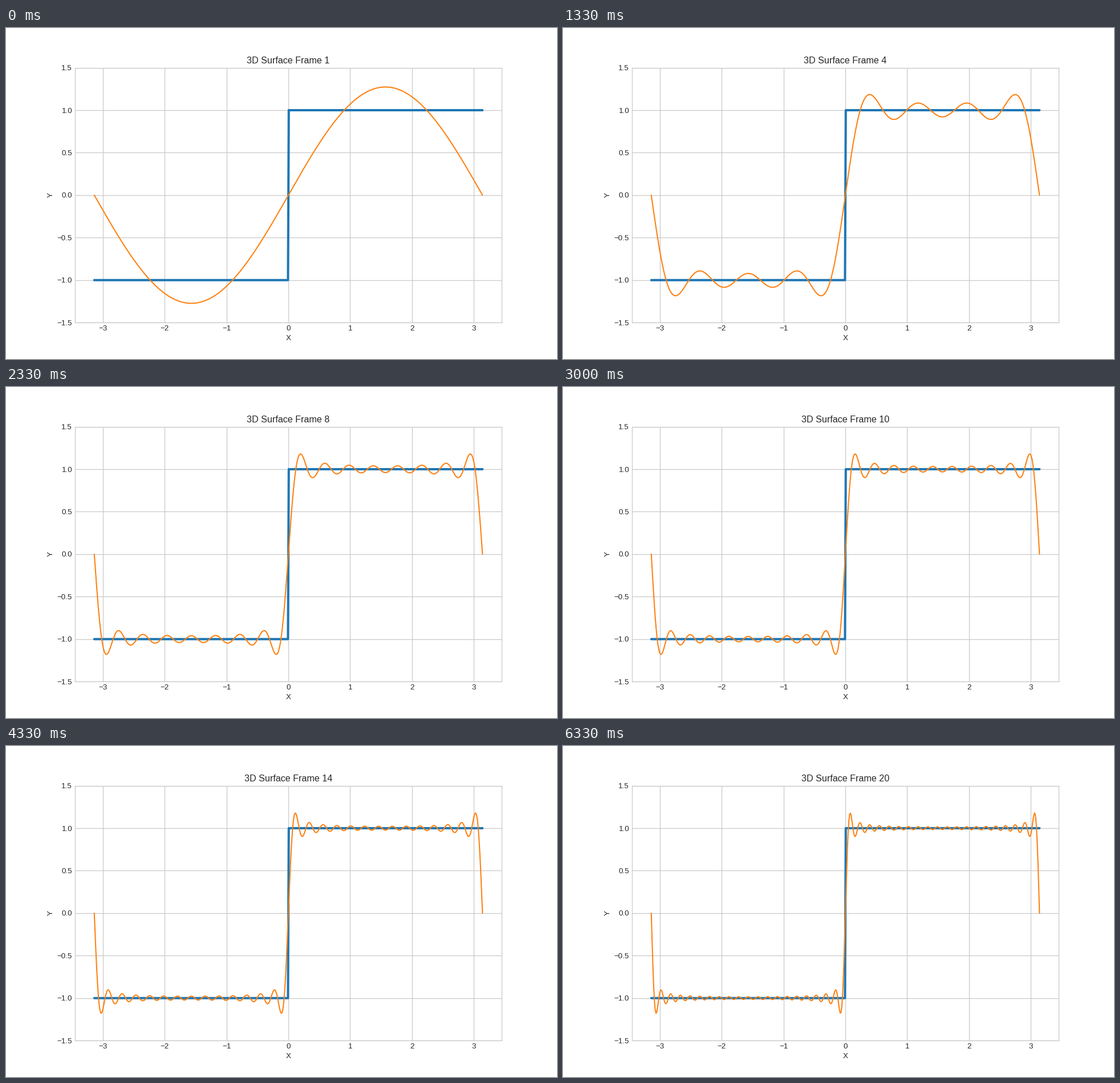
Write a matplotlib script that moves like this. It is 966x580 px and loops after 6660 ms.

```python
import numpy as np
import matplotlib.pyplot as plt
from matplotlib.animation import FuncAnimation

WIDTH, HEIGHT, DPI = 966, 580, 96
SCALE = 96.6 / DPI  # sizes below are meant for a 10 inch wide figure
FRAMES, INTERVAL = 20, 333
INK, RULE = "0.15", "0.8"

plt.rcParams.update({
    "font.family": "Liberation Sans",
    "font.size": 10 * SCALE,
    "axes.titlesize": 12 * SCALE,
    "axes.labelsize": 10 * SCALE,
    "text.color": INK,
    "axes.labelcolor": INK,
    "xtick.color": INK,
    "ytick.color": INK,
    "xtick.major.size": 0,
    "ytick.major.size": 0,
    "axes.edgecolor": RULE,
    "axes.linewidth": SCALE,
    "axes.axisbelow": True,
    "axes.grid": True,
    "grid.color": RULE,
    "grid.linewidth": SCALE,
    "lines.solid_capstyle": "round",
})

x = np.linspace(-np.pi, np.pi, 500)


def partial_sum(terms):
    """Fourier series of the square wave, cut after the given odd terms."""
    odd = 2 * np.arange(terms)[:, None] + 1
    return 4 / np.pi * (np.sin(odd * x) / odd).sum(axis=0)


fig, ax = plt.subplots(figsize=(WIDTH / DPI, HEIGHT / DPI), dpi=DPI)
ax.plot(x, np.sign(x), color="#1f77b4", lw=3 * SCALE)
series, = ax.plot(x, partial_sum(1), color="#ff7f0e", lw=1.5 * SCALE)
ax.set_ylim(-1.5, 1.5)
ax.set_xlabel("X")
ax.set_ylabel("Y")
title = ax.set_title("")


def update(i):
    series.set_ydata(partial_sum(i + 1))
    title.set_text(f"3D Surface Frame {i + 1}")
    return series, title


anim = FuncAnimation(fig, update, frames=FRAMES, interval=INTERVAL,
                     repeat=True, repeat_delay=0)
plt.show()
```
